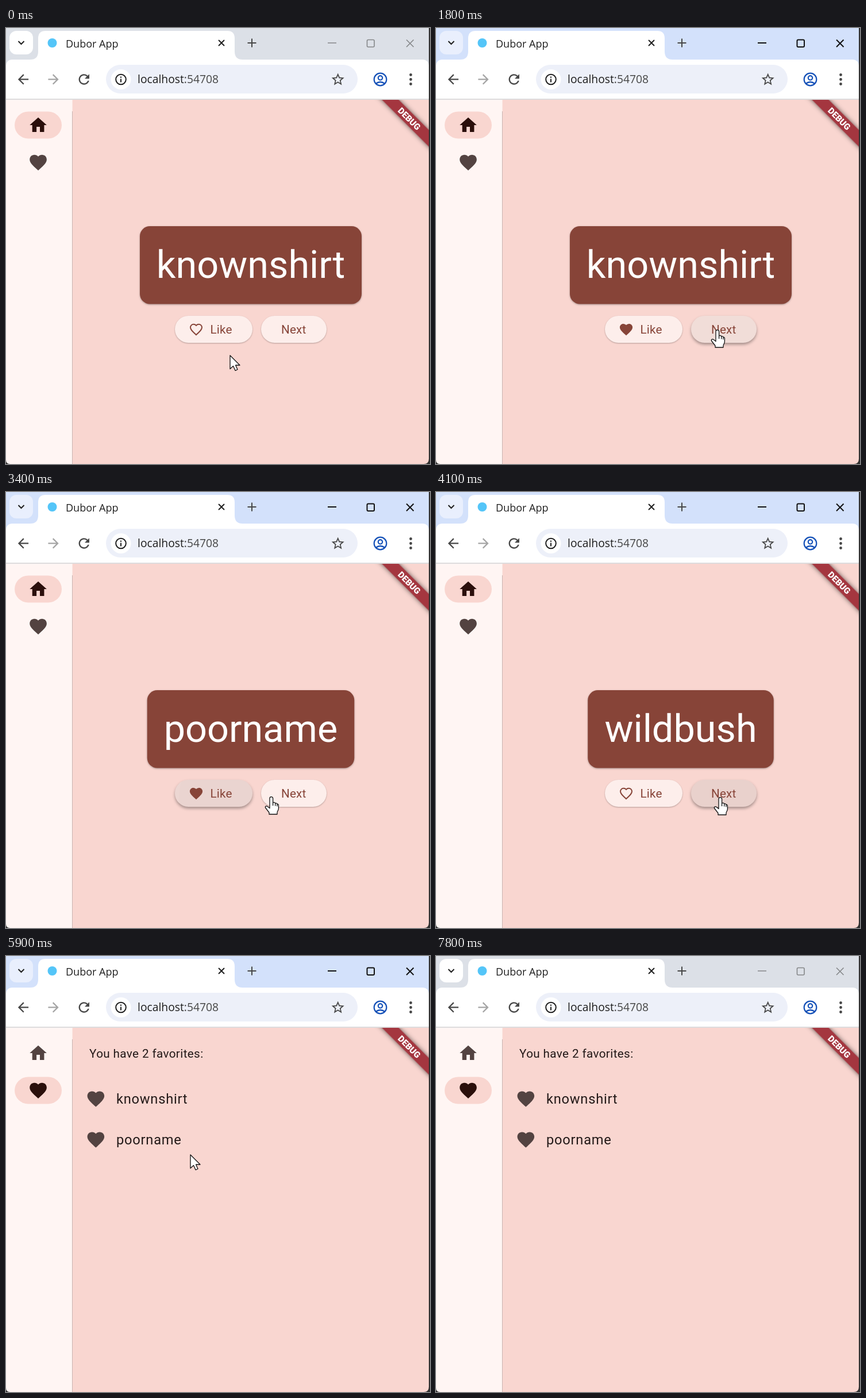
An HTML page that plays this animation: 738 px wide and 759 px high, repeating every 7.9 s.

```html
<!DOCTYPE html>
<html lang="en">
<head>
<meta charset="utf-8">
<title>Word pairs</title>
<style>
  html, body { margin: 0; width: 100%; height: 100%; overflow: hidden; background: #303030; }
  svg { display: block; width: 738px; height: 759px; }
  text { font-family: Roboto, sans-serif; white-space: pre; }
  .ui { font-family: "Open Sans", "Noto Sans", sans-serif; }
  .line { fill: none; stroke: #1f1f1f; stroke-width: 2; }
</style>
</head>
<body>
<svg viewBox="0 0 738 759">
  <defs>
    <path id="homeIcon" d="M10 20v-6h4v6h5v-8h3L12 3 2 12h3v8z"/>
    <path id="heart" d="M12 21.35l-1.45-1.32C5.4 15.36 2 12.28 2 8.5 2 5.42 4.42 3 7.5 3c1.74 0 3.41.81 4.5 2.09C13.09 3.81 14.76 3 16.5 3 19.58 3 22 5.42 22 8.5c0 3.78-3.4 6.86-8.55 11.54z"/>
    <path id="back" d="M20 11H7.83l5.59-5.59L12 4l-8 8 8 8 1.41-1.41L7.83 13H20z"/>
    <clipPath id="window"><path d="M0 0H736V750Q736 759 727 759H7Q0 759 0 752Z"/></clipPath>
    <clipPath id="page"><rect x="115" y="125" width="621" height="634"/></clipPath>
    <clipPath id="likeClip"><rect x="294" y="501" width="135" height="47" rx="23.5"/></clipPath>
    <clipPath id="nextClip"><rect x="444" y="501" width="114" height="47" rx="23.5"/></clipPath>
    <clipPath id="favsClip"><rect x="15" y="210.5" width="82" height="47" rx="23.5"/></clipPath>
  </defs>

  <g clip-path="url(#window)">
    <rect id="titleBar" width="738" height="140"/>
    <rect id="tabMenu" x="6" y="5" width="41" height="41" rx="12"/>
    <path class="line" d="M21.5 23l5 5 5-5"/>
    <path d="M42 55Q56 55 56 41V18Q56 5 69 5H385Q398 5 398 18V41Q398 55 412 55Z" fill="#fff"/>
    <rect y="55" width="736" height="90" rx="10" fill="#fff"/>
    <circle cx="80.500" cy="26" r="8" fill="#54c5f8"/>
    <text class="ui" x="104" y="34" font-size="18" fill="#1f1f1f">Dubor App</text>
    <path class="line" d="M370 21l10 10M380 21l-10 10"/>
    <path class="line" d="M420.500 26h15M428 18.500v15" stroke="#444" style="stroke:#474747"/>
    <g id="controls" fill="none">
      <path d="M560 26h15M697 20.500l12.500 12.500M709.500 20.500l-12.500 12.500"/>
      <rect x="628.500" y="20.500" width="12.500" height="12.500" rx="2"/>
    </g>

    <use href="#back" transform="translate(16.300 75.800) scale(1.14)" fill="#474747"/>
    <use href="#back" transform="translate(96.200 75.800) scale(-1.14 1.14)" fill="#a5a5a5"/>
    <path transform="translate(122 75.600) scale(1.15)" fill="#474747" d="M17.650 6.350A8 8 0 1 0 19.730 14h-2.080A6 6 0 1 1 12 6c1.660 0 3.140.69 4.220 1.780L13 11h7V4z"/>
    <rect x="174" y="64" width="438" height="50" rx="25" fill="#edf0f9"/>
    <circle cx="200" cy="89.500" r="17.500" fill="#fff"/>
    <circle class="line" cx="200" cy="89.500" r="8.800"/>
    <path class="line" d="M200 88.500v6M200 84.500v2.200"/>
    <text class="ui" x="229" y="96" font-size="19.300" fill="#1f1f1f">localhost<tspan fill="#474747">:54708</tspan></text>
    <path transform="translate(564.500 76.300) scale(1.1)" fill="#474747" d="M22 9.240l-7.190-.62L12 2 9.190 8.630 2 9.240l5.460 4.730L5.820 21 12 17.270 18.180 21l-1.630-7.030zM12 15.400l-3.760 2.270 1-4.280-3.320-2.880 4.380-.38L12 6.100l1.710 4.040 4.380.38-3.320 2.880 1 4.280z" fill-rule="evenodd"/>
    <g fill="none" stroke="#1652b8" stroke-width="2.200">
      <circle cx="651.500" cy="89.500" r="10.800"/><circle cx="651.500" cy="86.800" r="3.700"/>
      <path d="M643.500 97Q651.500 91 659.500 97"/>
    </g>
    <g fill="#474747">
      <circle cx="704.500" cy="81.500" r="2.400"/><circle cx="704.500" cy="89.500" r="2.400"/><circle cx="704.500" cy="97.500" r="2.400"/>
    </g>
    <rect y="123" width="736" height="2" fill="#dddcdd"/>

    <rect y="125" width="115.500" height="634" fill="#fff5f3"/>
    <rect x="115.500" y="125" width="621" height="634" fill="#f9d6d0"/>
    <rect id="indicator" x="-41" y="-23.500" width="82" height="47" rx="23.500" fill="#f9d6d0"/>
    <g id="favsInk" clip-path="url(#favsClip)"></g>
    <use id="homeNav" href="#homeIcon" transform="translate(38.300 151.300) scale(1.48)"/>
    <use id="favsNav" href="#heart" transform="translate(38.300 216.300) scale(1.48)"/>

    <g id="generator">
      <rect id="card" y="345" height="135.500" rx="17.500" fill="#874438" style="filter:drop-shadow(0 1.500px 1.500px #0005)"/>
      <text id="pair" x="426" y="435" font-size="66.600" fill="#fff" text-anchor="middle"></text>
      <rect id="likeBox" x="294" y="501" width="135" height="47" rx="23.500" fill="#fdeeeb"/>
      <g id="likeInk" clip-path="url(#likeClip)"></g>
      <use id="likeIcon" href="#heart" transform="translate(317.700 511.600) scale(1.11)" stroke="#874438"/>
      <rect id="nextBox" x="444" y="501" width="114" height="47" rx="23.500" fill="#fdeeeb"/>
      <g id="nextInk" clip-path="url(#nextClip)"></g>
      <g font-size="20.700" fill="#874438" letter-spacing=".15">
        <text x="355.500" y="532">Like</text><text x="479" y="532">Next</text>
      </g>
    </g>

    <g id="favorites" fill="#231918">
      <text x="145" y="177" font-size="20.700" letter-spacing=".37">You have 2 favorites:</text>
      <g font-size="23.700" letter-spacing=".74">
        <text x="192" y="256.500">knownshirt</text><text x="192" y="327.500">poorname</text>
      </g>
      <g fill="#534341">
        <use href="#heart" transform="translate(138.600 231) scale(1.48)"/>
        <use href="#heart" transform="translate(138.600 302) scale(1.48)"/>
      </g>
    </g>

    <g clip-path="url(#page)">
      <g transform="translate(702 158) rotate(45)">
        <rect x="-80" y="-10.300" width="160" height="20.600" fill="#a4363f" style="filter:drop-shadow(0 0 4px #0009)"/>
        <text y="5.400" font-size="15.100" font-weight="900" fill="#fff" text-anchor="middle">DEBUG</text>
      </g>
    </g>

    <g id="cursor" fill="#fff" stroke="#111" stroke-width="1.300" stroke-linejoin="round">
      <path id="arrow" d="M0 0V23.500L5.500 18.500 9 26.300 13 24.500 9.600 17H17Z"/>
      <path id="hand" d="M-3 2.500A2.800 2.800 0 0 1 2.600 2.500V10C4 8.800 6.400 9.400 6.700 11 8 10.200 9.800 10.800 10 12.200 11.200 11.800 12.400 12.600 12.400 14V20C12.400 23 10 25 10 27V30H-4V27L-10.500 18.500C-11.500 16.800-9 14.600-7 16.300L-3 19.500ZM2.600 10v5M6.700 11v4.500M10 12.200v4"/>
    </g>
  </g>
</svg>
<script>
const LOOP = 7900, STEP = 100;
const FOCUS = [1000, 7400];
const OPEN_FAVORITES = 5200;
const byId = id => document.getElementById(id);
const set = (id, attrs) => {
  for (const name in attrs) byId(id).setAttribute(name, attrs[name]);
};
const show = (id, on) => set(id, { display: on ? 'inline' : 'none' });
const clamp = v => Math.max(0, Math.min(1, v));
const ease = v => v * v * (3 - 2 * v);
const within = (t, [from, to]) => t >= from && t < to;

// time, x, y of the pointer tip
const track = [
  [0, 390, 570], [300, 390, 570], [800, 369, 523], [1300, 369, 523],
  [1800, 490, 526], [2400, 490, 526], [2600, 427, 531], [2800, 383, 532],
  [3200, 383, 532], [3400, 462, 531], [3600, 495, 532], [4100, 495, 532],
  [4800, 61, 241], [5400, 61, 241], [5900, 321, 346], [6400, 305, 328],
  [6700, 305, 328], [7200, 330, -40], [LOOP, 330, -40]
];

const targets = {
  like: { box: [294, 501, 135, 47], presses: [1000, 2900], tint: '#874438', hover: .1 },
  next: { box: [444, 501, 114, 47], presses: [2000, 3700], tint: '#874438', hover: .1 },
  favs: { box: [15, 210.5, 82, 47], presses: [5000], tint: '#231918', hover: .12 }
};

const pairs = [
  { text: 'knownshirt', width: 386, from: 0, liked: [1200, 2100] },
  { text: 'poorname', width: 360.5, from: 2100, liked: [3000, 3800] },
  { text: 'wildbush', width: 323.5, from: 3800, liked: [0, 0] }
];

for (const name in targets) {
  const { box: [x, y, width, height], tint } = targets[name];
  byId(name + 'Ink').innerHTML =
    `<rect id="${name}Shade" x="${x}" y="${y}" width="${width}" height="${height}" fill="${tint}"/>` +
    `<circle id="${name}Ripple" fill="${tint}"/>`;
}

function pointer(t) {
  const i = Math.max(1, track.findIndex(key => key[0] >= t));
  const [t0, x0, y0] = track[i - 1], [t1, x1, y1] = track[i];
  const k = ease(clamp((t - t0) / (t1 - t0)));
  return [x0 + (x1 - x0) * k, y0 + (y1 - y0) * k];
}

const hits = ([px, py], [x, y, w, h]) => px >= x && px <= x + w && py >= y && py <= y + h;

function drawInk(name, t) {
  const { box, presses, hover } = targets[name];
  const over = hits(pointer(Math.max(0, t - STEP)), box);
  const press = presses.filter(p => p <= t).pop();
  const age = press === undefined ? Infinity : t - press;
  const fade = clamp((800 - age) / 600);
  const [x, y] = pointer(press || 0);
  const settled = age > 200 ? .08 * fade : 0;
  set(name + 'Shade', { opacity: (over ? hover : 0) + settled });
  set(name + 'Ripple', {
    cx: x, cy: y, r: age < 900 ? 12 + age * .14 : 0,
    opacity: age <= 200 ? .06 : .03 * fade
  });
  if (name !== 'favs') {
    byId(name + 'Box').style.filter = over
      ? 'drop-shadow(0 3px 2.5px #0005)' : 'drop-shadow(0 1.5px 1px #0004)';
  }
}

function draw(t) {
  const active = within(t, FOCUS), listing = t >= OPEN_FAVORITES;
  set('titleBar', { fill: active ? '#d3e1fb' : '#dce0e7' });
  set('tabMenu', { fill: active ? '#e9effd' : '#fff' });
  set('controls', { stroke: active ? '#111' : '#858789', 'stroke-width': active ? 2 : 1.6 });

  const grow = listing ? ease(clamp((t - OPEN_FAVORITES + STEP) / 300)) : 1;
  set('indicator', { transform: `translate(56 ${listing ? 234 : 169}) scale(${grow} 1)` });
  set('homeNav', { fill: listing ? '#534341' : '#2b0f0b' });
  set('favsNav', { fill: listing ? '#2b0f0b' : '#534341' });
  show('generator', !listing);
  show('favorites', listing);

  const pair = pairs.filter(p => p.from <= t).pop();
  const liked = within(t, pair.liked);
  byId('pair').textContent = pair.text;
  set('card', { x: 426 - pair.width / 2, width: pair.width });
  set('likeIcon', liked
    ? { fill: '#874438', 'stroke-width': 0, transform: 'translate(317.7 511.6) scale(1.11)' }
    : { fill: 'none', 'stroke-width': 2, transform: 'translate(319 512.8) scale(1)' });
  for (const name in targets) drawInk(name, t);

  const at = pointer(t);
  const onLink = hits(at, targets.favs.box) || hits(at, [15, 146, 82, 47]) ||
    !listing && (hits(at, targets.like.box) || hits(at, targets.next.box));
  set('cursor', { transform: `translate(${at})` });
  show('hand', onLink);
  show('arrow', !onLink);
}

const start = performance.now();
function tick() {
  const t = (performance.now() - start) % LOOP;
  draw(Math.floor(t / STEP) * STEP);
  requestAnimationFrame(tick);
}
draw(0);
requestAnimationFrame(tick);
</script>
</body>
</html>
```
